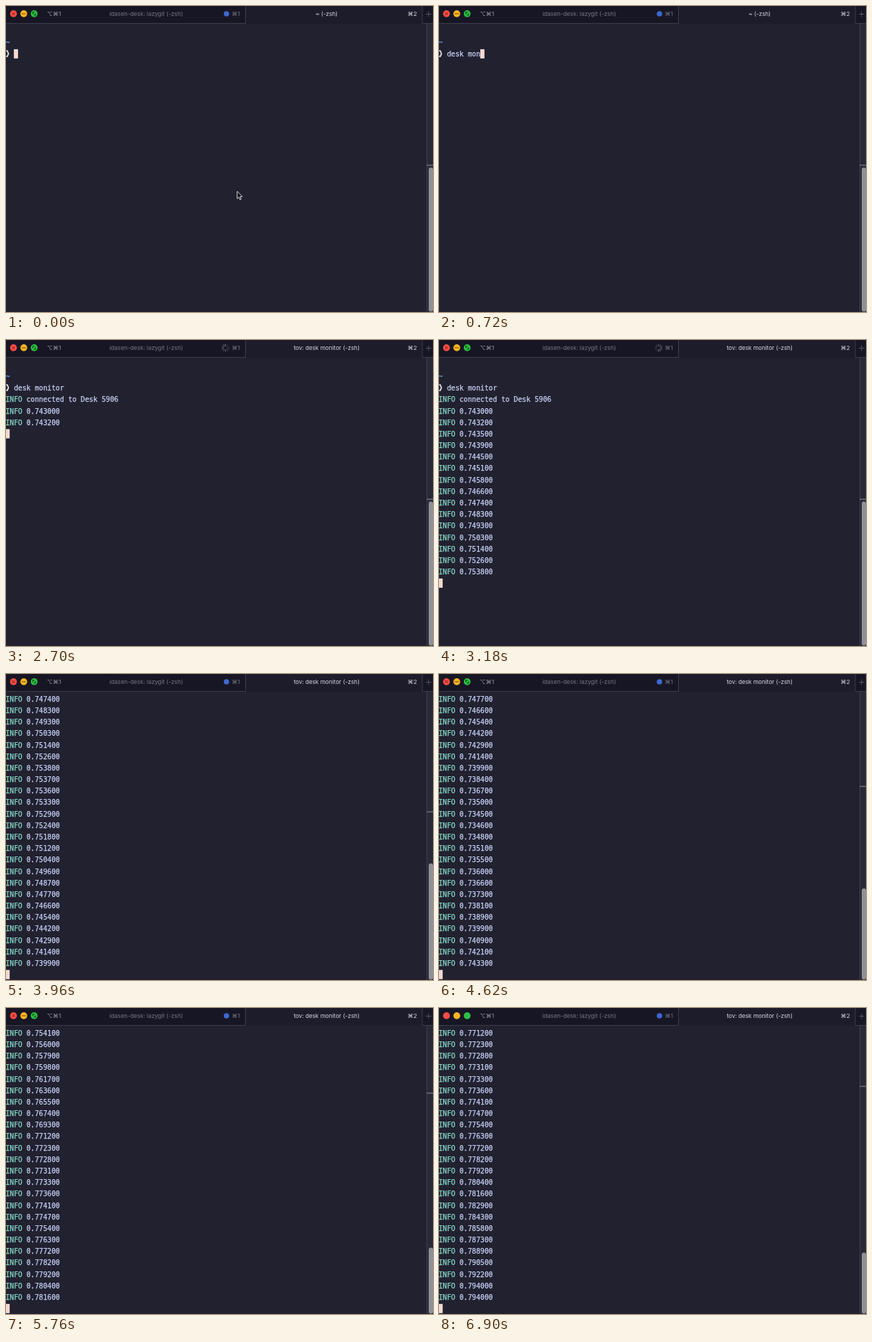
Recreate the animation shown at these times as an HTML page with a canvas. Size 600 by 431 pixels, loop 6.96 s.

```html
<!DOCTYPE html>
<html lang="en">
<head>
<meta charset="utf-8">
<title>Desk monitor</title>
<style>
html, body { margin: 0; width: 100%; height: 100%; overflow: hidden; background: #212130; }
canvas { display: block; width: 600px; height: 431px; }
</style>
</head>
<body>
<canvas id="stage"></canvas>
<script>
const W = 600, H = 431, LOOP = 6960, STEP = 60;
const ROW = 16.18, CELL = 5.87, ROWS = 25, TAB_H = 25;
const MONO = '9.75px "DejaVu Sans Mono", monospace';
const UI = '8.2px Inter, "DejaVu Sans", sans-serif';
const COMMAND = 'desk monitor';
const C = {
  bg: '#212130', tab: '#171624', activeTab: '#1d1c2b', edge: '#3d3c48',
  text: '#c9d2f5', info: '#88d9c5', path: '#6ba4f8', caret: '#f5d9d2',
  dim: '#797884', key: '#9a99a3', bright: '#d9d9e0', mark: '#6c6b76'
};

// Keys are [x, value, power]; each stretch eases in by its power.
// Desk travel by reading, in tenths of a millimetre: it gathers speed, then halts.
const TRAVEL = [[0, 7430], [14, 7538, 1.6], [34, 7350, 1.88], [35, 7345, 1],
  [55, 7541, 1.86], [64, 7712, 1], [67, 7731, 0.5], [86, 7940, 1.64]];
// Readings printed by time in ms.
const PRINTED = [[2340, 0], [2400, 1, 1], [2640, 1, 1], [2700, 2, 1], [3180, 15, 1],
  [3960, 32, 1], [4620, 49, 1], [5160, 70, 1], [5280, 70, 1], [6240, 88, 1]];

const canvas = document.getElementById('stage');
const ctx = canvas.getContext('2d');
const dpr = window.devicePixelRatio || 1;
canvas.width = W * dpr;
canvas.height = H * dpr;

function follow(keys, x) {
  const next = keys.findIndex(k => x < k[0]);
  if (next < 0) return keys[keys.length - 1][1];
  if (next === 0) return keys[0][1];
  const [x0, a] = keys[next - 1], [x1, b, power] = keys[next];
  return a + (b - a) * ((x - x0) / (x1 - x0)) ** power;
}

const readingsAt = t => Math.floor(follow(PRINTED, t) + 1e-6);
const reading = i => '0.' + Math.round(follow(TRAVEL, i)) + '00';
const scrolledBy = n => Math.max(0, n + 5 - ROWS);
const rowY = row => 34.8 + row * ROW;

function rect(x, y, w, h, color) {
  ctx.fillStyle = color;
  ctx.fillRect(x, y, w, h);
}

function disc(x, y, r, color) {
  ctx.fillStyle = color;
  ctx.beginPath();
  ctx.arc(x, y, r, 0, Math.PI * 2);
  ctx.fill();
}

function lines(color, width, ...paths) {
  ctx.strokeStyle = color;
  ctx.lineWidth = width;
  ctx.beginPath();
  for (const p of paths) {
    ctx.moveTo(p[0], p[1]);
    for (let i = 2; i < p.length; i += 2) ctx.lineTo(p[i], p[i + 1]);
  }
  ctx.stroke();
}

// The thin outline gives a medium weight.
function print(str, cell, row, color) {
  const x = cell * CELL - 0.6, y = rowY(row) + 4;
  ctx.font = MONO;
  ctx.textAlign = 'left';
  ctx.fillStyle = ctx.strokeStyle = color;
  ctx.lineWidth = 0.25;
  ctx.fillText(str, x, y);
  ctx.strokeText(str, x, y);
}

function label(str, x, color) {
  ctx.font = UI;
  ctx.textAlign = 'center';
  ctx.fillStyle = color;
  ctx.fillText(str, x, 14);
}

function windowButtons(hover) {
  disc(10.5, 10.9, 4.8, '#fb4d46');
  disc(25, 10.9, 4.8, '#fbb425');
  disc(39.6, 10.9, 4.8, '#2cc043');
  if (!hover) return;
  lines('#8c1611', 1, [8.6, 9, 12.4, 12.8], [12.4, 9, 8.6, 12.8]);
  lines('#8c5706', 1.2, [22.2, 10.9, 27.8, 10.9]);
  ctx.fillStyle = '#0c6119';
  for (const s of [-1, 1]) {
    ctx.beginPath();
    ctx.moveTo(39.6 + s * 2.6, 10.9 + s * 2.6);
    ctx.lineTo(39.6 + s * 2.6, 10.9 - s * 1.2);
    ctx.lineTo(39.6 - s * 1.2, 10.9 + s * 2.6);
    ctx.fill();
  }
}

function spinner(t) {
  const head = Math.floor(t / 80);
  ctx.lineCap = 'round';
  for (let i = 0; i < 12; i++) {
    const a = i * Math.PI / 6, c = Math.cos(a), s = Math.sin(a);
    const age = ((head - i) % 12 + 12) % 12;
    lines(`rgba(170,170,182,${0.75 - age * 0.05})`, 0.9,
      [308.5 + c * 2.8, 11 + s * 2.8, 308.5 + c * 5.2, 11 + s * 5.2]);
  }
  ctx.lineCap = 'butt';
}

function tabs(t) {
  rect(0, 0, W, TAB_H, C.tab);
  rect(337, 0, 248, TAB_H, C.activeTab);
  rect(0, 24, 337, 1, C.edge);
  rect(336, 0, 1, TAB_H, C.edge);
  rect(584.5, 0, 1, TAB_H, C.edge);
  rect(585, 24, 15, 1, C.edge);
  windowButtons(t < 6600);
  label('⌥⌘1', 67.3, C.key);
  label('idasen-desk: lazygit (-zsh)', 197, C.dim);
  if (t >= 2700 && t < 3660) spinner(t);
  else disc(309.8, 11, 3.8, '#3e68d0');
  label('⌘1', 323, C.dim);
  label(t < 1140 ? '~ (-zsh)' : 'tov: desk monitor (-zsh)', 450.5, C.bright);
  label('⌘2', 570.8, C.bright);
  lines('#5c5b67', 0.9, [589.8, 11.5, 597.8, 11.5], [593.8, 7.5, 593.8, 15.5]);
}

function scrollbar(t, off) {
  rect(591, TAB_H, 9, H - TAB_H, '#292836');
  rect(591, TAB_H, 1, H - TAB_H, '#41404c');
  const top = 430.5 - 406 * ROWS / (50 + off);
  // The prompt mark trails the text a little.
  const mark = 26.6 + 9887 / (50 + scrolledBy(readingsAt(t - 120)));
  rect(591, mark - 0.8, 9, 1.6, C.mark);
  ctx.fillStyle = '#918f97';
  ctx.beginPath();
  ctx.roundRect(594, top, 6, 430.5 - top, 3);
  ctx.fill();
}

function terminal(t, n, off) {
  const first = 1 - off;
  if (off < 2) print('~', 0, first, C.path);
  if (off < 3) {
    const y = rowY(first + 1);
    lines('#e3e5f2', 1.7, [0.4, y - 4, 1.7, y - 4, 3.5, y, 1.7, y + 4, 0.4, y + 4]);
    const keys = Math.floor((t - 300) / STEP) + 1;
    const typed = Math.max(0, Math.min(12, Math.floor(keys * 12 / 11)));
    print(COMMAND.slice(0, typed), 2, first + 1, C.text);
    if (t < 1080) return caret(2 + typed, first + 1);
  }
  if (t < 2340) return caret(0, 3);
  if (off < 4) {
    print('INFO', 0, first + 2, C.info);
    print('connected to Desk 5906', 5, first + 2, C.text);
  }
  for (let i = Math.max(0, off - 4); i < n; i++) {
    print('INFO', 0, 4 + i - off, C.info);
    print(reading(i), 5, 4 + i - off, C.text);
  }
  caret(0, 4 + n - off);
}

function caret(cell, row) {
  rect(cell * CELL - 0.7, rowY(row) - 6.3, CELL, 13, C.caret);
}

function pointer() {
  ctx.beginPath();
  [[324.8, 261], [324.8, 271.3], [327.2, 269.2], [328.8, 272.8], [330.4, 272.1],
    [328.9, 268.6], [332, 268.4]].forEach(p => ctx.lineTo(...p));
  ctx.closePath();
  ctx.fillStyle = '#0b0b10';
  ctx.fill();
  ctx.strokeStyle = '#f0f0f4';
  ctx.lineWidth = 0.9;
  ctx.stroke();
}

function draw(now) {
  const t = Math.floor(now % LOOP / STEP) * STEP;
  const n = readingsAt(t), off = scrolledBy(n);
  ctx.setTransform(dpr, 0, 0, dpr, 0, 0);
  rect(0, 0, W, H, C.bg);
  terminal(t, n, off);
  tabs(t);
  scrollbar(t, off);
  if (t < 120) pointer();
}

let start;
function tick(now) {
  start ??= now;
  draw(Math.max(0, now - start));
  requestAnimationFrame(tick);
}
draw(0);
requestAnimationFrame(tick);
</script>
</body>
</html>
```
